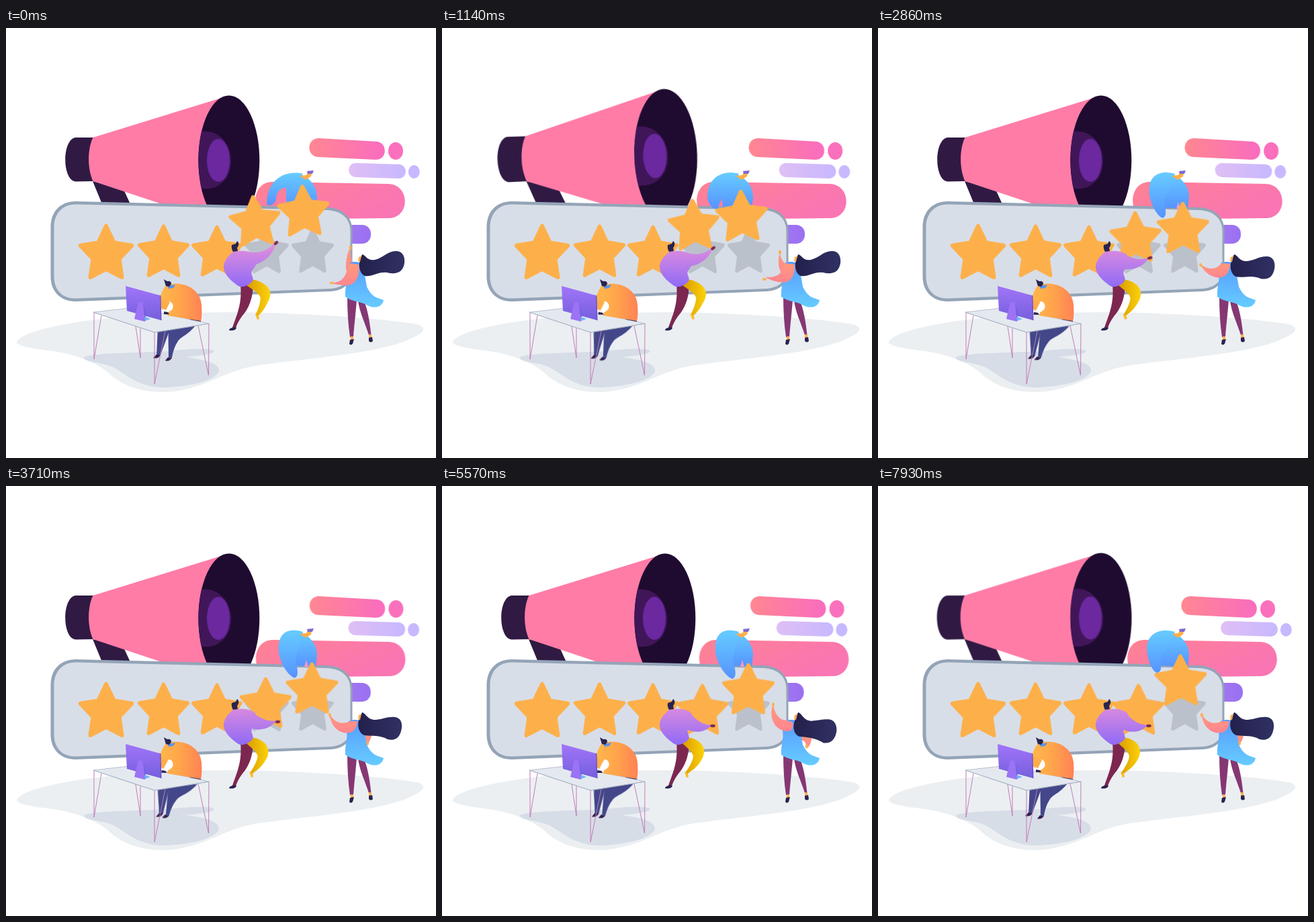
An HTML page without scripts that plays this animation: 640 px wide and 640 px high, repeating every 8000 ms.

```html
<!DOCTYPE html>
<html lang="en">
<head>
<meta charset="utf-8">
<title>Star rating</title>
<style>
html, body { margin: 0; height: 100%; overflow: hidden; background: #fff; }
svg { display: block; width: 100%; height: 100%; }
.anim { animation: 8s linear infinite; }

/* drifting bars */
.drift { animation: drift 2s cubic-bezier(.37,0,.63,1) infinite alternate; }
@keyframes drift { to { transform: translateX(var(--dx)); } }

/* megaphone pulse */
.horn { animation-name: pulse; transform-origin: 186px 290px; animation-timing-function: cubic-bezier(.4,0,.6,1); }
@keyframes pulse {
  0%, 19%, 48.3%, 67.4%, 97.4% { transform: none; }
  9.7%, 58% { transform: rotate(-3.3deg) scale(1.055); }
  100% { transform: rotate(-.2deg) scale(1.003); }
}

/* flying stars */
.star4 { animation-name: star4; }
@keyframes star4 {
  0% { transform: translate(371px,290px) rotate(-5deg) scale(.92,.94); animation-timing-function: cubic-bezier(.4,.2,.8,.7); }
  25.9% { transform: translate(380.5px,303px) rotate(-2deg) scale(.92,.94); }
  46.4% { transform: translate(386.5px,326px) scale(.92,.94); animation-timing-function: ease-out; }
  65%, 100% { transform: translate(387.5px,336px) scale(.92,.94); }
}
.star5 { animation-name: star5; }
@keyframes star5 {
  0% { transform: translate(443px,275px) rotate(-3deg) scale(.93,.95); animation-timing-function: cubic-bezier(.35,.1,.4,1); }
  57.5%, 67.5% { transform: translate(456px,305.5px) scale(.93,.95); animation-timing-function: cubic-bezier(.7,0,.9,.6); }
  100% { transform: translate(450px,291px) rotate(-1deg) scale(.93,.95); }
}

/* man on the panel */
.reach { animation-name: reach; }
@keyframes reach {
  0% { d: path("M442 217C420 211 388 222 388 262C391 266 398 264 402 256C402 240 412 235 424 240Z"); }
  25.9% { d: path("M442 217C422 211 398 218 401 248C404 265 411 277 416 279C424 278 420 266 420 255Z"); animation-timing-function: ease-out; }
  57.5%, 67.5% { d: path("M442 217C425 212 404 213 407 248C411 270 425 285 432 287C440 285 436 270 433 258Z"); animation-timing-function: cubic-bezier(.7,0,.9,.6); }
  100% { d: path("M442 217C422 211 396 218 400 248C402 265 408 275 413 277C422 276 419 266 419 255Z"); }
}

/* man with the fourth star */
.arm { animation-name: arm; }
@keyframes arm {
  0% { d: path("M355 332C375 337 388 333 401 319C401 334 384 352 364 353Z"); }
  25.9% { d: path("M355 332C370 338 386 346 404 333C399 348 380 358 364 356Z"); animation-timing-function: ease-out; }
  65%, 100% { d: path("M355 332C374 336 376 354 401 356C392 367 376 369 362 361Z"); }
}
.hand { animation-name: hand; }
@keyframes hand {
  0% { transform: translate(402px,320px) rotate(-45deg); }
  25.9% { transform: translate(405px,334px) rotate(-30deg); }
  46.4% { transform: translate(404.5px,351px) rotate(-5deg); animation-timing-function: ease-out; }
  65%, 100% { transform: translate(403px,357px); }
}
.knee { animation-name: knee; }
@keyframes knee {
  0% { d: path("M357 382C362 375 366 373 374 376C395 384 397 396 389 409C385 418 380 424 376 428L371 427C376 418 378 410 379 402C377 394 364 388 357 382Z"); animation-timing-function: cubic-bezier(.37,0,.63,1); }
  60%, 100% { d: path("M357 382C362 375 366 373 374 376C392 383 393 397 386 408C380 419 371 424 366 428L362 427C368 418 373 410 374 402C372 394 362 388 357 382Z"); }
}
.foot { animation-name: foot; }
@keyframes foot {
  0% { transform: translateX(10px); animation-timing-function: cubic-bezier(.37,0,.63,1); }
  60%, 100% { transform: none; }
}

/* woman */
.armA { animation-name: armA; }
@keyframes armA {
  0% { d: path("M516 375C507 370 504 358 507 343C508 336 510 331 512 328C514 340 512 352 524 352Z"); }
  14.2% { d: path("M517 374C505 370 500 358 501 345C501 341 502 338 503 335C505 347 510 354 522 351Z"); }
  25.9% { d: path("M518 373C508 372 500 366 496 358C494 355 493 352 493 350C498 358 507 362 515 350Z"); }
  46.4%, 99%, 100% { d: path("M528 370C536 369 540 370 544 372C543 376 541 381 538 384C536 382 538 377 528 376Z"); }
  72% { d: path("M530 372C540 370 548 372 551 376C550 382 548 387 545 390C540 388 546 378 530 378Z"); }
}
.handA { animation-name: handA; }
@keyframes handA {
  0% { transform: translate(512.5px,327px); }
  14.2% { transform: translate(503px,333.5px); }
  25.9% { transform: translate(493px,350px); }
  46.4%, 99%, 100% { transform: translate(538px,383px); }
  72% { transform: translate(543px,388px); }
}
.armB { animation-name: armB; }
@keyframes armB {
  0% { d: path("M525 352C528 372 518 384 506 383C499 382 491 382 485 380C495 378 506 377 510 350Z"); }
  25.9% { d: path("M525 352C524 368 518 376 506 375C496 374 486 370 479 363C490 366 506 366 510 350Z"); }
  46.4%, 99%, 100% { d: path("M523 350C522 366 512 369 502 367C490 364 482 352 482 340C489 352 500 356 512 350Z"); }
  72% { d: path("M522 352C524 366 516 367 506 363C492 357 487 338 494 324C496 338 502 348 514 349Z"); }
}
.handB { animation-name: handB; }
@keyframes handB {
  0% { transform: translate(485px,379.5px) rotate(90deg); }
  14.2% { transform: translate(480px,374px) rotate(100deg); }
  25.9% { transform: translate(479px,364px) rotate(130deg); }
  46.4%, 99%, 100% { transform: translate(482px,341px) rotate(170deg); }
  72% { transform: translate(494px,324px) rotate(185deg); }
}
.hair { animation-name: hair; }
@keyframes hair {
  0%, 14% { d: path("M530 337C536 338 537 347 549 345C562 342 568 331 582 332C591 333 594 341 593 350C591 362 584 366 572 365C556 360 546 371 534 369C527 366 524 355 527 345Z"); }
  46.4%, 99%, 100% { d: path("M530 337C536 338 537 348 550 348C562 347 568 343 579 344C587 345 590 352 589 360C587 374 580 380 568 377C556 370 545 373 533 371C525 367 522 357 526 346Z"); }
  72% { d: path("M530 337C536 338 537 349 550 350C562 349 568 347 578 348C585 350 588 358 587 366C585 378 578 384 568 383C556 376 545 374 531 373C523 369 521 359 526 346Z"); }
}

/* man at the desk */
.shinL, .shinR { animation-name: shin; }
.shinL { --turn: -6deg; transform-origin: 234px 450px; }
.shinR { --turn: 6deg; transform-origin: 250px 450px; }
@keyframes shin {
  0%, 86%, 100% { transform: none; }
  14% { transform: rotate(calc(var(--turn) * .55)); }
  26%, 70% { transform: rotate(calc(var(--turn) * .9)); }
  45% { transform: rotate(var(--turn)); }
}
.type { animation: type .33s ease-in-out infinite alternate; }
@keyframes type { from { transform: translate(2px,0); } to { transform: translate(-2px,1px); } }
</style>
</head>
<body>
<svg viewBox="0 0 640 640">
  <defs>
    <path id="star" d="M0-41L12-17L39-12.7L20 6.5L24 33L0 21L-24 33L-20 6.5L-39-12.7L-12-17Z" stroke-width="6" stroke-linejoin="round"/>
    <linearGradient id="rose"><stop stop-color="#ff8791"/><stop offset="1" stop-color="#fa6cc0"/></linearGradient>
    <linearGradient id="rose2" x2="1" y2=".5"><stop stop-color="#ff8293"/><stop offset="1" stop-color="#f975b4"/></linearGradient>
    <linearGradient id="lilac"><stop stop-color="#dfbff5"/><stop offset="1" stop-color="#c8b8ff"/></linearGradient>
    <linearGradient id="violet"><stop stop-color="#b086f0"/><stop offset="1" stop-color="#9a70f2"/></linearGradient>
    <linearGradient id="screen" x2="0" y2="1"><stop stop-color="#a175f9"/><stop offset="1" stop-color="#755fdd"/></linearGradient>
    <linearGradient id="sky" x2="0" y2="1"><stop stop-color="#66ccff"/><stop offset="1" stop-color="#5693ff"/></linearGradient>
    <linearGradient id="dress" x2="0" y2="1"><stop stop-color="#579bff"/><stop offset="1" stop-color="#66ccff"/></linearGradient>
    <linearGradient id="shirt" gradientUnits="userSpaceOnUse" x1="0" y1="325" x2="0" y2="384"><stop stop-color="#df8ddd"/><stop offset="1" stop-color="#916bf6"/></linearGradient>
    <linearGradient id="amber"><stop stop-color="#ffb84a"/><stop offset=".5" stop-color="#ffa44b"/><stop offset="1" stop-color="#ff8255"/></linearGradient>
    <linearGradient id="gold"><stop stop-color="#d99a00"/><stop offset="1" stop-color="#fcd20a"/></linearGradient>
    <linearGradient id="night"><stop stop-color="#23204c"/><stop offset="1" stop-color="#303163"/></linearGradient>
    <linearGradient id="coral" x2="0" y2="1"><stop stop-color="#ff9a7c"/><stop offset="1" stop-color="#ff8490"/></linearGradient>
  </defs>

  <!-- ground -->
  <path fill="#ebeff2" d="M16 468C20 452 90 438 160 431C240 424 300 423 350 423C450 425 560 432 612 441C625 445 624 452 609 459C565 485 440 492 370 503C325 511 300 534 250 541C210 545 180 535 160 520C140 500 110 487 70 481C40 477 18 474 16 468Z"/>
  <path fill="#d7dde7" d="M116 490C130 483 190 484 240 481C270 478 305 475 310 481C309 486 285 488 268 490C300 494 318 500 317 511C312 525 270 535 230 535C195 533 180 516 160 505C143 497 115 498 116 490Z"/>

  <!-- bars -->
  <g class="drift" style="--dx:-5px"><rect x="440" y="293" width="103" height="28" rx="13" fill="url(#violet)"/></g>
  <g class="drift" style="--dx:13px"><path fill="url(#rose2)" d="M396 229L569 232C602 233 602 283 569 283L396 285C363 285 363 229 396 229Z"/></g>
  <g class="drift" style="--dx:8.5px">
    <path fill="url(#rose)" d="M465 164L552 169C568 171 568 196 550 196L464 192C447 190 447 165 465 164Z"/>
    <ellipse cx="580" cy="183" rx="11" ry="13" fill="#fa70bd"/>
  </g>
  <g class="drift" style="--dx:-14px">
    <path fill="url(#lilac)" d="M520 201L586 203C598 205 598 223 585 224L520 222C507 220 507 202 520 201Z"/>
    <ellipse cx="607.3" cy="214" rx="8.5" ry="10" fill="#c8b8ff"/>
  </g>

  <!-- megaphone -->
  <g class="anim horn">
    <path fill="#301a43" d="M129 228L143 262L185 262L174 238ZM131 163L104 163C83 165 83 227 104 228.500L131 228Z"/>
    <path fill="#ff7ca7" d="M129.500 163L324 103L310 288L129.500 228C121 210 121 180 129.500 163Z"/>
    <ellipse cx="331.800" cy="197" rx="45.500" ry="96.500" fill="#1f0b30"/>
    <path fill="#401659" d="M291 154C315 151 335 170 335 198C335 226 315 242 291 239Q282 196 291 154Z"/>
    <ellipse cx="316" cy="197" rx="17" ry="32" fill="#6b289f"/>
  </g>

  <!-- panel: the rim is thinner on the right -->
  <path fill="#94a4b7" d="M104 258L478 267C502 268 515.500 282 515.500 302L515.500 360C515.500 380 503 391 482 392L104 407C80 407 66.500 391 66.500 370L66.500 296C66.500 273 81 258 104 258Z"/>
  <path fill="#d8dee8" d="M104 262.500L478 271C500 272 512.500 284 512.500 302L512.500 360C512.500 377 501 387 482 388L104 402.500C83 403 71.500 389 71.500 370L71.500 296C71.500 277 84 262 104 262.500Z"/>
  <g fill="#bbc1cb" stroke="#bbc1cb">
    <use href="#star" transform="translate(388 334) scale(.78 .86)"/>
    <use href="#star" transform="translate(456.500 334) scale(.75 .84)"/>
  </g>
  <g fill="#fdb04a" stroke="#fdb04a">
    <use href="#star" transform="translate(149 337) scale(.98 1.030)"/>
    <use href="#star" transform="translate(234.500 335.500) scale(.92 .98)"/>
    <use href="#star" transform="translate(314 335.500) scale(.9 .95)"/>
  </g>

  <!-- man on the panel -->
  <path fill="url(#sky)" d="M425 216C445 215 463 231 463 252L461 269L418 267C417 250 414 235 425 216Z"/>
  <path fill="#f79ac4" d="M447 259L450 269L444 269Z"/>
  <path class="anim reach" fill="url(#sky)" d="M442 217C420 211 388 222 388 262C391 266 398 264 402 256C402 240 412 235 424 240Z"/>
  <path fill="#ffae4a" d="M437 220L447 219L449 215L455 216L454 221L446 226Z"/>
  <path fill="#7f68d4" d="M448 213L458 212L456 217L449 217Z"/>

  <g fill="#fdb04a" stroke="#fdb04a">
    <use class="anim star4" href="#star"/>
    <use class="anim star5" href="#star"/>
  </g>

  <!-- man with the fourth star -->
  <path fill="#7c2750" d="M349 382L368 380C368 402 361 418 352 428C346 436 343 443 342 447L337 446C342 430 352 412 349 382Z"/>
  <path fill="#2a2350" d="M343 446C342 450 337 451 332 450C332 447 337 446 339 445Z"/>
  <path class="anim knee" fill="url(#gold)" d="M357 382C362 375 366 373 374 376C395 384 397 396 389 409C385 418 380 424 376 428L371 427C376 418 378 410 379 402C377 394 364 388 357 382Z"/>
  <path class="anim foot" fill="#fcb91e" d="M361 426L366 428L367 433L364 434Z"/>
  <path fill="url(#shirt)" d="M338 333C350 331 362 331 370 337C378 347 371 354 366 362C363 367 371 373 366 378C360 384 351 387 346 384C334 376 323 365 324 354C325 345 332 338 338 333Z"/>
  <path class="anim arm" fill="url(#shirt)" d="M355 332C375 337 388 333 401 319C401 334 384 352 364 353Z"/>
  <ellipse class="anim hand" rx="3.800" ry="2.200" fill="#7d2c50"/>
  <path fill="#ffae4a" d="M341 328L348 321L349 329L345 333Z"/>
  <path fill="#282350" d="M336 323L342 321L344 317C347 319 347 324 344 327L345 332L338 333Q335 328 336 323Z"/>

  <!-- woman -->
  <path class="anim armA" fill="url(#coral)" d="M516 375C507 370 504 358 507 343C508 336 510 331 512 328C514 340 512 352 524 352Z"/>
  <ellipse class="anim handA" rx="2" ry="3" fill="#ffae4a"/>
  <path fill="#853774" d="M508 400L522 404C521 420 518 445 517 460L512 460C509 440 508 420 508 400ZM524 405L534 409C539 422 542 442 543.500 457L540 457C535 440 526 424 524 405Z"/>
  <path fill="#ffae4a" d="M513 459h4v6h-4ZM540 456h4v5h-4Z"/>
  <path fill="#2a2350" d="M512 464L518 463L516 470Q513 473 511 470ZM540 461L545 460L546 466Q543 469 540 466Z"/>
  <path fill="url(#dress)" d="M510 350C525 344 537 352 534 368L537 385C545 402 553 401 562 405C560 416 548 418 538 413C530 407 515 408 505 400C504 385 509 378 507 365Z"/>
  <path class="anim armB" fill="url(#coral)" d="M525 352C528 372 518 384 506 383C499 382 491 382 485 380C495 378 506 377 510 350Z"/>
  <ellipse class="anim handB" rx="1.800" ry="3.200" fill="#ffae4a"/>
  <path class="anim hair" fill="url(#night)" d="M530 337C536 338 537 347 549 345C562 342 568 331 582 332C591 333 594 341 593 350C591 362 584 366 572 365C556 360 546 371 534 369C527 366 524 355 527 345Z"/>
  <path fill="#ffae4a" d="M525 341L529 339L527 348L524 347Z"/>

  <!-- man at the desk -->
  <g fill="#43478a">
    <g class="anim shinL">
      <path d="M226 447L245 445C240 460 234 475 230 487L224 487C225 475 225 460 226 447Z"/>
      <path fill="#342052" d="M224 486L230 487Q226 493 219 491Z"/>
    </g>
    <g class="anim shinR">
      <path d="M242 446L284 440C272 457 262 458 256 466C250 475 248 485 247 491L242 490C242 475 241 460 242 446Z"/>
      <path fill="#342052" d="M241 490L247 491Q243 497 237 495Z"/>
    </g>
  </g>
  <path fill="#e4e9f0" stroke="#aab4c4" stroke-width=".8" d="M130 423L192 416L302 440L221 453Z"/>
  <path fill="#2a2350" d="M272 431L290 433L290 437L274 434Z"/>
  <path fill="url(#amber)" d="M238 383C265 374 290 390 291 412C292 425 291 433 290 436L240 428L241 423C252 419 250 408 242 407L233 420C227 412 227 398 238 383Z"/>
  <path fill="#fff" d="M242 407C250 408 250 419 242 422L234 421Z"/>
  <g class="type">
    <path fill="#ffac4b" d="M229 402L242 408L236 420L230 417Z"/>
    <path fill="#2a2350" d="M233 422L239 423L241 426L233 426Z"/>
  </g>
  <path fill="#ffae4a" d="M237 382L245 379L247 386L240 388Z"/>
  <path fill="#5b94e8" d="M240 384L252 382L249 387L242 388Z"/>
  <path fill="#282350" d="M235 374L240 377Q246 376 246 381L243 385L238 384Z"/>

  <path fill="url(#screen)" d="M178 384L229 398L231 435L180 421Z"/>
  <path fill="#6b50c8" d="M229 398L230.500 399L231.500 435L230 435Z"/>
  <path fill="#9b73f4" d="M197 408L204 409L207 437L191 433Z"/>
  <path fill="#6a62e0" d="M204 409L208 428L207 437Z"/>
  <path fill="#6cb8f5" d="M207 430L215 433L207 436Z"/>
  <path fill="none" stroke="#c27bb6" d="M131 424V493L142 428M193 444L200 491V447M221 453V530L237 451M302 440L301.500 517L286 443"/>
  <path fill="none" stroke="#aab4c4" d="M130 423L221 453L302 440"/>
</svg>
</body>
</html>
```
